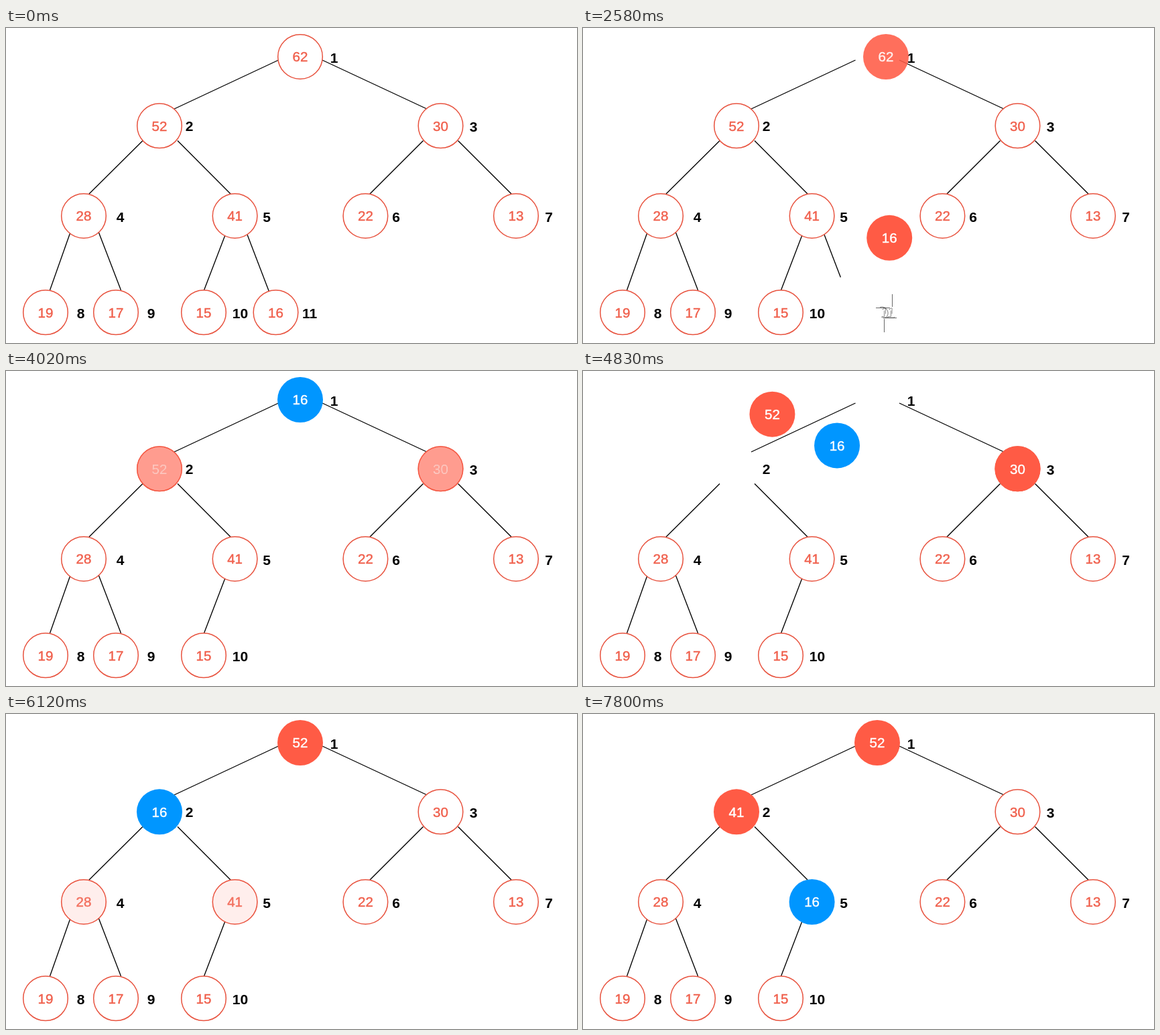
These frames come from a looping animation (852 px wide and 471 px high, 7.83 s). An HTML page with a canvas:

```html
<!DOCTYPE html>
<html lang="en">
<head>
<meta charset="utf-8">
<title>Heap: remove the maximum</title>
<style>
html, body { margin: 0; width: 100%; height: 100%; overflow: hidden; background: #fff; }
canvas { display: block; width: 852px; height: 471px; }
</style>
</head>
<body>
<canvas id="stage" width="852" height="471"></canvas>
<script>
const ctx = document.getElementById('stage').getContext('2d');
const LOOP = 7830, STEP = 30;
const RED = '#ff5b45', BLUE = '#0096ff', OUTLINE = '#e8533f', INK = '#f0604d';
const FONT = '"Liberation Sans", Arial, sans-serif';

// Slots 1 to 11: centre of the circle, value, centre of the index label
const slots = [
  null,
  [439, 43, 62, 489.5, 44.5], [229, 146.3, 52, 273.5, 146], [648.5, 146.3, 30, 697.5, 147],
  [116, 281, 28, 170.5, 282], [341.6, 281, 41, 389, 282], [536.4, 281, 22, 582, 282],
  [761, 281, 13, 810, 282], [59, 425.3, 19, 111.5, 426], [164, 425.3, 17, 216.5, 426],
  [295, 425.3, 15, 349.5, 426], [402.5, 425.3, 16, 453, 426]
];
const edges = [
  [406.5, 48, 251, 121], [472, 48, 628, 121],
  [204, 168.5, 124, 248], [256, 168.5, 335, 248],
  [622.5, 168.5, 543, 248], [674.5, 168.5, 754, 248],
  [95.5, 307, 65.5, 392], [138.5, 306, 171.5, 392],
  [326.5, 311, 295.5, 392], [360, 309, 392.5, 394]
];

const part = (t, from, span) => Math.min(1, Math.max(0, (t - from) / span));
const ease = p => p < 0.5 ? 2 * p * p : 1 - 2 * (1 - p) * (1 - p);

function line(x1, y1, x2, y2, width = 1.35) {
  ctx.lineWidth = width;
  ctx.strokeStyle = '#000';
  ctx.beginPath();
  ctx.moveTo(x1, y1);
  ctx.lineTo(x2, y2);
  ctx.stroke();
}

function label(text, x, y) {
  ctx.font = 'bold 21px ' + FONT;
  ctx.fillStyle = '#000';
  ctx.fillText(text, x, y + 7.5);
}

function value(text, x, y, color) {
  ctx.font = '20.5px ' + FONT;
  ctx.fillStyle = ctx.strokeStyle = color;
  ctx.lineWidth = 0.45;
  ctx.fillText(text, x, y + 7.4);
  ctx.strokeText(text, x, y + 7.4);
}

function ring(text, x, y) {
  ctx.beginPath();
  ctx.arc(x, y, 33.3, 0, 7);
  ctx.fillStyle = '#fff';
  ctx.fill();
  ctx.strokeStyle = OUTLINE;
  ctx.lineWidth = 1.5;
  ctx.stroke();
  value(text, x, y, INK);
}

function disc(text, x, y, color, alpha = 1) {
  if (alpha <= 0) return;
  ctx.globalAlpha = alpha;
  ctx.beginPath();
  ctx.arc(x, y, 34, 0, 7);
  ctx.fillStyle = color;
  ctx.fill();
  value(text, x, y, '#fff');
  ctx.globalAlpha = 1;
}

// Point on a bowed path between two slots; positive bend lies left of travel
function arc(from, to, p, bend) {
  const [x1, y1] = slots[from], [x2, y2] = slots[to];
  const dx = x2 - x1, dy = y2 - y1;
  const k = 4 * bend * p * (1 - p) / Math.hypot(dx, dy);
  return [x1 + dx * p + dy * k, y1 + dy * p - dx * k];
}

// The last index label breaks up into thin drifting strokes
function dissolveLabel(u) {
  const [, , , x, y] = slots[11];
  if (u <= 0) return label('11', x, y);
  if (u >= 0.8) return;
  const drift = 40 * (u - 0.25);
  ctx.globalAlpha = Math.max(0, 1 - u * 5);
  label('11', x, y);
  ctx.globalAlpha = Math.min(1, (0.8 - u) * 2) * 0.75;
  ctx.font = '20px ' + FONT;
  ctx.lineWidth = 0.6;
  ctx.strokeStyle = '#000';
  ctx.setLineDash([14, 30 * u]);
  ctx.strokeText('11', x + 2, y + 7);
  ctx.setLineDash([]);
  line(461.5, 398 - drift, 461.5, 417 - drift, 0.8);
  line(449.5, 435 + drift, 449.5, 455 + drift, 0.8);
  line(437 - drift, 418.5, 458 - drift, 418.5, 0.8);
  line(448 + drift, 433.5, 468 + drift, 433.5, 0.8);
  ctx.lineWidth = 0.7;
  ctx.beginPath();
  ctx.arc(446, 426, 9, -1.9, 0.9);
  ctx.stroke();
  ctx.globalAlpha = 1;
}

function draw(t) {
  ctx.fillStyle = '#fff';
  ctx.fillRect(0, 0, 852, 471);
  ctx.textAlign = 'center';

  const out = part(t, 2300, 1120);
  const rise = ease(part(t, 2300, 720));
  const swapA = ease(part(t, 4525, 720));
  const swapB = ease(part(t, 6640, 700));

  edges.forEach(([x1, y1, x2, y2], i) => {
    const keep = i === 9 ? 1 - out : 1;
    if (keep > 0) line(x1, y1, x1 + (x2 - x1) * keep, y1 + (y2 - y1) * keep);
  });
  for (let i = 1; i < 11; i++) label(i, slots[i][3], slots[i][4]);
  dissolveLabel(out);

  // Outlined circles stay until their filled copy takes over
  const fill = {
    1: part(t, 1000, 500),
    2: part(t, 3720, 500),
    3: part(t, 3720, 500) - part(t, 5400, 500),
    4: part(t, 6070, 500) - part(t, 7340, 400),
    5: part(t, 6070, 500),
    11: part(t, 1750, 500)
  };
  const movers = [1, 2, 5, 11];
  for (let i = 1; i <= 11; i++) {
    const [x, y, v] = slots[i];
    const a = fill[i] || 0;
    if (!(movers.includes(i) && a >= 1)) ring(v, x, y);
    if (!movers.includes(i)) disc(v, x, y, RED, a);
  }

  const gone = ease(out);
  disc(62, slots[1][0] + 104 * gone, slots[1][1], RED, fill[1] * (1 - gone));
  disc(52, ...arc(2, 1, swapA, 54), RED, fill[2]);
  disc(41, ...arc(5, 2, swapB, 45), RED, fill[5]);

  let spot = arc(11, 1, rise, -52);
  if (swapB > 0) spot = arc(2, 5, swapB, 35);
  else if (swapA > 0) spot = arc(1, 2, swapA, 38);
  const blue = part(t, 3120, 480);
  if (blue < 1) disc(16, ...spot, RED, fill[11]);
  disc(16, ...spot, BLUE, blue);
}

function tick() {
  const t = performance.now() % LOOP;
  draw(Math.floor(t / STEP) * STEP);
  requestAnimationFrame(tick);
}
draw(0);
requestAnimationFrame(tick);
</script>
</body>
</html>
```
